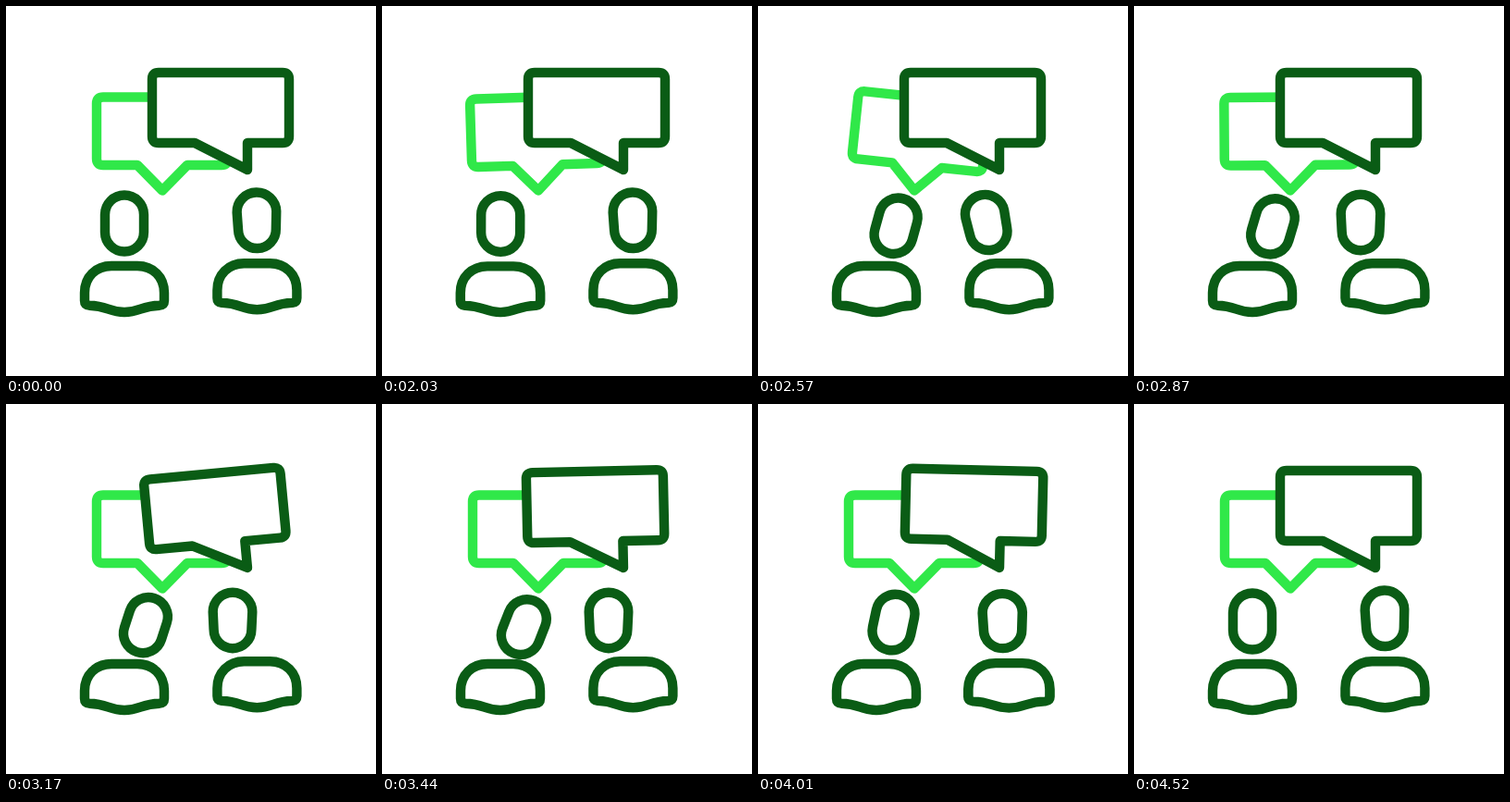
Recreate the animation shown at these times as an HTML page. Size 400 by 400 pixels, loop 4.55 s.

```html
<!DOCTYPE html>
<html lang="en">
<head>
<meta charset="utf-8">
<title>Two people talking</title>
<style>
  html, body { margin: 0; width: 100%; height: 100%; overflow: hidden; background: #fff; }
  svg { display: block; width: 100%; height: 100%; }
</style>
</head>
<body>
<svg viewBox="0 0 400 400" fill="none" stroke="#0a5c15" stroke-width="10.4" stroke-linecap="round" stroke-linejoin="round">
  <defs>
    <path id="torso" d="M-43 30.500 Q-43 35 -38 35.700 C-18 36 -17 43 0 43 C17 43 18 36 38 35.700 Q43 35 43 30.500 V22 C43 5 31 -7 14 -7 H-14 C-31 -7 -43 5 -43 22 Z"/>
  </defs>
  <path id="lightBubble" stroke="#30e849" d="M105 98.500 H233 Q240 98.500 240 105.500 V165 Q240 172 233 172 H196 L169 199.500 L142 172 H105 Q98 172 98 165 V105.500 Q98 98.500 105 98.500 Z"/>
  <path id="darkBubble" fill="#fff" d="M165 72 H299 Q306 72 306 79 V141 Q306 148 299 148 H261 V177 L204 148 H165 Q158 148 158 141 V79 Q158 72 165 72 Z"/>
  <use id="leftBody" href="#torso"/>
  <use id="rightBody" href="#torso"/>
  <path id="leftHead" d="M-21 -9.500 A21 21 0 0 1 21 -9.500 V9.500 A21 21 0 0 1 -21 9.500 Z"/>
  <path id="rightHead" d="M-21.300 -9.500 A21.300 21 0 0 1 21.300 -9.500 L20.400 9.500 A20.400 20.500 0 0 1 -20.400 9.500 Z"/>
</svg>
<script>
  const LOOP = 4550, START = 2030, STEP = 30;
  const $ = id => document.getElementById(id);
  const place = (id, value) => $(id).setAttribute('transform', value);
  const ease = u => (1 - Math.cos(Math.PI * u)) / 2;

  // Eased value of a list of [time, value] keys
  function track(t, keys) {
    if (t <= keys[0][0]) return keys[0][1];
    for (let i = 1; i < keys.length; i++) {
      const [t0, a] = keys[i - 1], [t1, b] = keys[i];
      if (t <= t1) return a + (b - a) * ease((t - t0) / (t1 - t0));
    }
    return keys[keys.length - 1][1];
  }

  // Decaying swing of a speech bubble around its tip
  const swing = t => track(t, [[0, 0], [160, -21], [472, 15.6], [702, -9.3], [992, 5], [1114, 0]]);

  // Quick sink and slow rise while a person turns
  const dip = (t, from, to) => track(t, [[from, 0], [from + (to - from) * 0.32, 1], [to, 0]]);

  function body(id, x, y, d) {
    place(id, `translate(${x} ${y + 43 + d * 0.8}) scale(${1 + d * 0.05} ${1 - d * 0.06}) translate(0 -43)`);
  }

  function head(id, x, y, angle, d) {
    place(id, `translate(${x} ${y + d * 4.6}) rotate(${angle}) scale(${1 + d * 0.025} ${1 - d * 0.05})`);
  }

  function draw(t) {
    place('lightBubble', `rotate(${swing(t - 2000)} 169 199.500)`);
    place('darkBubble', `rotate(${swing(t - 3116)} 261 177)`);

    const dl = dip(t, 2000, 2460) + dip(t, 4010, 4520);
    const dr = dip(t, 2045, 2540) + dip(t, 3670, 4185);
    body('leftBody', 128, 288, dl);
    body('rightBody', 271.4, 285.2, dr);

    const turn = track(t, [[2000, 0], [2460, 1], [4010, 1], [4520, 0]]);
    const nod = track(t, [[2250, 0], [2570, 3.5], [3130, 5.5], [3360, 11.5], [3645, 0]]);
    head('leftHead', 128 + 18.5 * turn, 235 + turn, 12 * turn, dl);
    $('leftHead').setAttribute('transform',
      `rotate(${nod} 119 280) ` + $('leftHead').getAttribute('transform'));

    const x = track(t, [[2045, 271.2], [2550, 247.2], [2900, 245], [3670, 245], [4185, 271.2]]);
    const y = track(t, [[2045, 232], [2550, 234.2], [3670, 234.2], [4185, 232]]);
    const tilt = track(t, [[2045, -1.5], [2550, -12], [2900, 0], [3670, 0], [4185, -1.5]]);
    head('rightHead', x, y, tilt, dr);
  }

  const origin = performance.now();
  function tick() {
    const t = (performance.now() - origin) % LOOP;
    draw(t < START ? 0 : START + Math.floor((t - START) / STEP) * STEP);
    requestAnimationFrame(tick);
  }
  tick();
</script>
</body>
</html>
```
